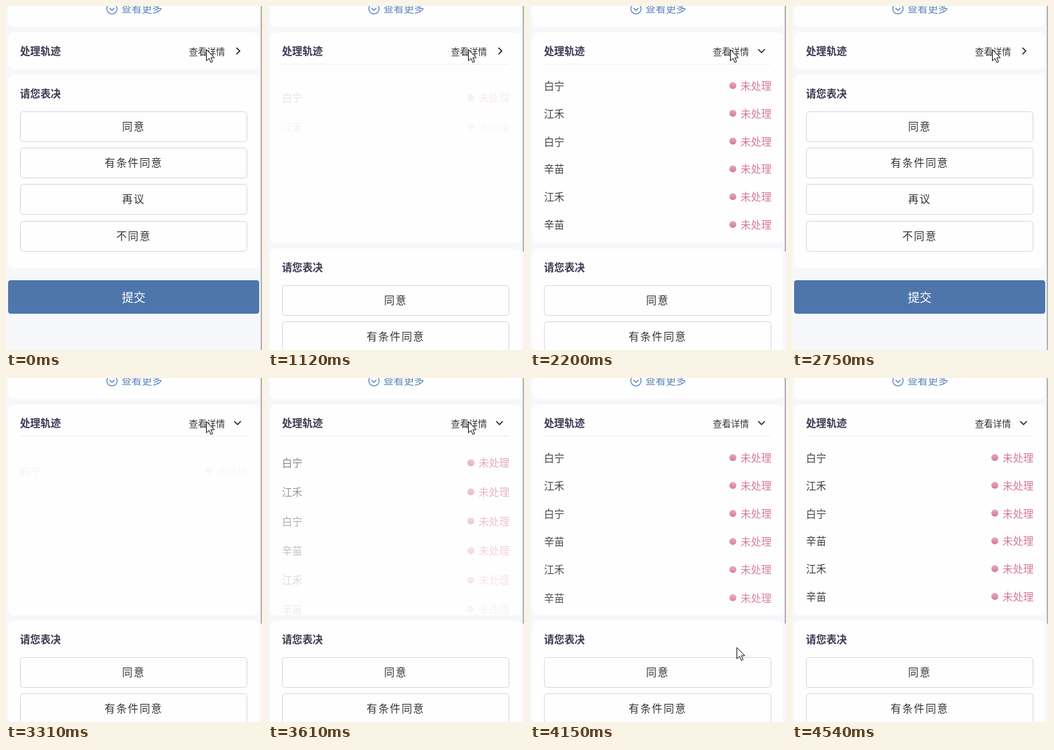
An HTML page for the animation above (4810 ms loop, 366 by 493 pixels).

```html
<!DOCTYPE html>
<html lang="zh-CN">
<head>
<meta charset="utf-8">
<title>处理轨迹</title>
<style>
  html, body { margin: 0; width: 100%; height: 100%; overflow: hidden; background: #f6f7fb; }
  svg { display: block; width: 366px; height: 493px; }
  text { font-family: "Noto Sans CJK SC", "Noto Sans CJK", sans-serif; white-space: pre; }
</style>
</head>
<body>
<svg id="stage" viewBox="0 0 366 493">
  <defs>
    <linearGradient id="pink" x1="0" y1="0" x2="0" y2="1">
      <stop offset="0" stop-color="#e6aabf"/>
      <stop offset="1" stop-color="#d67799"/>
    </linearGradient>
  </defs>
</svg>
<script>
const LOOP = 4810;
const ROW_GAP = 39.8, STAGGER = 54, ROW_TIME = 1000, RISE = 20;
const OPEN_SHIFT = 249;
const PEOPLE = ["白宁", "江禾", "白宁", "辛苗", "江禾", "辛苗"];
const OPTIONS = ["同意", "有条件同意", "再议", "不同意"];

// The picture is refreshed only at these moments.
const TICKS = [0, 1120, 1270, 1390, 1510, 1630, 1750, 1900, 2050, 2200, 2750,
  3310, 3460, 3610, 3730, 3880, 4000, 4150, 4270, 4420, 4540];

// Pointer path as [time, x, y], straight between the points.
const POINTER = [[3610, 286.5, 62.5], [3730, 293, 236], [3880, 295.5, 304.5],
  [4000, 295.5, 308], [4270, 296, 449]];
const POINTER_GONE = 4420;

const stage = document.getElementById("stage");

function add(parent, tag, attrs, content) {
  const el = document.createElementNS("http://www.w3.org/2000/svg", tag);
  for (const key in attrs) el.setAttribute(key, attrs[key]);
  if (content) el.textContent = content;
  parent.appendChild(el);
  return el;
}

const group = parent => add(parent, "g", {});

function label(parent, content, x, middle, size, fill, extra = {}) {
  return add(parent, "text",
    { x, y: middle + size * 0.37, "font-size": size, fill, ...extra }, content);
}

function card(parent, y, height) {
  return add(parent, "rect", { x: 3, y, width: 359, height, rx: 8, fill: "#fefefe" });
}

function line(parent, d, stroke, width) {
  return add(parent, "path", { d, fill: "none", stroke, "stroke-width": width });
}

function heading(parent, content, middle) {
  label(parent, content, 20, middle, 14.6, "#3b3a52", { "font-weight": 700 });
}

// "More" link, cut by the top edge
card(stage, -60, 90);
add(stage, "circle", { cx: 151.5, cy: 4, r: 7.4, fill: "none", stroke: "#5b84bd", "stroke-width": 1.3 });
line(stage, "M148 2.8L151.5 6.3L155 2.8", "#5b84bd", 1.3);
label(stage, "查看更多", 165, 4, 14.6, "#5b84bd");

// Track card
const trackCard = card(stage, 38, 52);
heading(stage, "处理轨迹", 65);
label(stage, "查看详情", 261.5, 65, 12.9, "#333");
const arrow = line(stage, "", "#222", 1.6);
const track = group(stage);
line(track, "M20 83.5H344", "#eeeff2", 1);
const rows = PEOPLE.map((name, i) => {
  const row = group(track);
  const middle = 114.5 + i * ROW_GAP;
  label(row, name, 20, middle, 14.6, "#404040");
  add(row, "circle", { cx: 290, cy: middle - 0.5, r: 5, fill: "url(#pink)" });
  label(row, "未处理", 301, middle, 14.8, "#d7779a");
  return row;
});

// Vote card and submit button
const vote = group(stage);
card(vote, 98.5, 277.5);
heading(vote, "请您表决", 125.7);
OPTIONS.forEach((name, i) => {
  const y = 151.5 + Math.round(i * 52.2);
  add(vote, "rect", { x: 20.5, y, width: 324, height: 43, rx: 4, fill: "#fefefe", stroke: "#d0dae6" });
  label(vote, name, 182.6, y + 21, 15, "#333", { "letter-spacing": 1.6, "text-anchor": "middle" });
});
add(vote, "rect", { x: 3, y: 393, width: 359, height: 48, rx: 4, fill: "#4e76aa" });
label(vote, "提交", 182.5, 418, 17, "#fff", { "text-anchor": "middle" });

const scrollbar = add(stage, "rect", { x: 364, y: 0, width: 2, fill: "#b4b5b8" });
const pointer = add(stage, "path", {
  d: "M0 0V16L3.8 12.6L6.4 18.4L8.9 17.3L6.4 11.6H11.3Z",
  fill: "#fff", stroke: "#111", "stroke-width": 1
});

function pointerAt(t) {
  if (t <= POINTER[0][0]) return POINTER[0].slice(1);
  for (let i = 1; i < POINTER.length; i++) {
    const [t0, x0, y0] = POINTER[i - 1], [t1, x1, y1] = POINTER[i];
    if (t <= t1) {
      const k = (t - t0) / (t1 - t0);
      return [x0 + (x1 - x0) * k, y0 + (y1 - y0) * k];
    }
  }
  return POINTER[POINTER.length - 1].slice(1);
}

// The CSS "ease" curve, cubic-bezier(.25, .1, .25, 1), solved by bisection.
function ease(x) {
  if (x <= 0) return 0;
  if (x >= 1) return 1;
  const bezier = (a, b, s) => 3 * a * s * (1 - s) ** 2 + 3 * b * s * s * (1 - s) + s ** 3;
  let low = 0, high = 1;
  for (let i = 0; i < 20; i++) {
    const mid = (low + high) / 2;
    if (bezier(0.25, 0.25, mid) < x) low = mid; else high = mid;
  }
  return bezier(0.1, 1, low);
}

function draw(now) {
  const clock = now % LOOP;
  const t = TICKS.filter(tick => tick <= clock).pop();
  const open = (t >= 1120 && t < 2750) || t >= 3310;
  const arrowDown = open && t !== 1120;
  const start = t < 2750 ? 1000 : 3244;

  trackCard.setAttribute("height", open ? 302 : 52);
  track.setAttribute("visibility", open ? "visible" : "hidden");
  vote.setAttribute("transform", `translate(0 ${open ? OPEN_SHIFT : 0})`);
  scrollbar.setAttribute("height", open ? 352 : 493);
  arrow.setAttribute("d", arrowDown
    ? "M326.3 62L331 66.7L335.7 62" : "M329.5 59.8L334.2 64.5L329.5 69.2");

  rows.forEach((row, i) => {
    const shown = ease((t - start - i * STAGGER) / ROW_TIME);
    row.setAttribute("opacity", shown);
    row.setAttribute("transform", `translate(0 ${RISE * (1 - shown)})`);
  });

  pointer.setAttribute("visibility", t < POINTER_GONE ? "visible" : "hidden");
  pointer.setAttribute("transform", `translate(${pointerAt(t)})`);
}

const begin = performance.now();
function frame() {
  draw(performance.now() - begin);
  requestAnimationFrame(frame);
}
frame();
</script>
</body>
</html>
```
